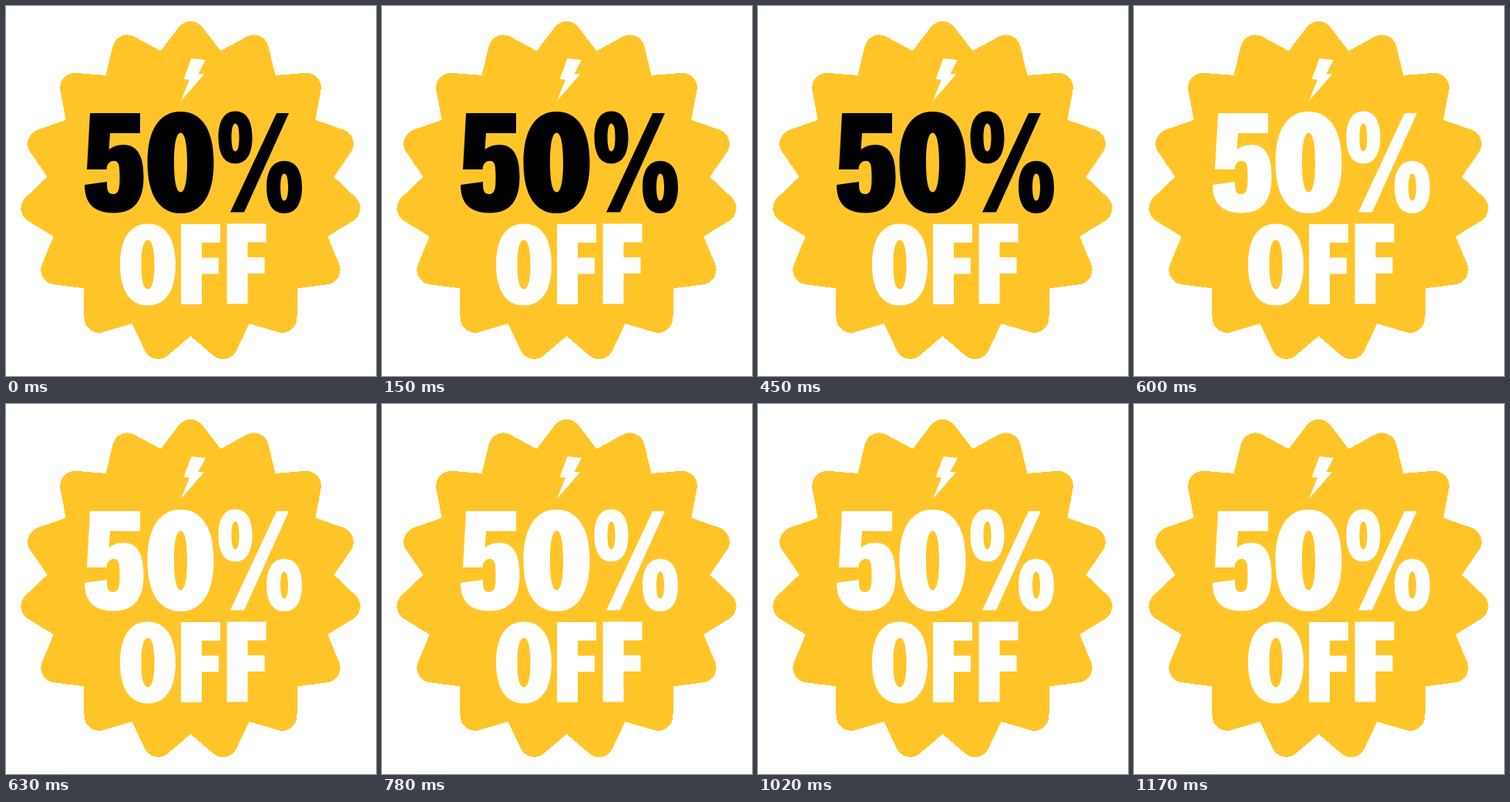
Animation of 480x480 px, one loop 1200 ms. Source, as an HTML page:

```html
<!DOCTYPE html>
<html lang="en">
<head>
<meta charset="utf-8">
<title>50% OFF</title>
<style>
  html, body { margin: 0; width: 100%; height: 100%; overflow: hidden; background: #fff; }
  svg { display: block; width: 100vw; height: 100vh; }
  #badge {
    fill: #ffc528; stroke: #ffc528; stroke-width: 38.4; stroke-linejoin: round;
    shape-rendering: crispEdges;
  }
  .white { fill: #fff; }
  #amount { animation: blink 1200ms step-end infinite; }
  path { fill-rule: evenodd; }
  @keyframes blink {
    0% { fill: #000; }
    50% { fill: #fff; }
  }
</style>
</head>
<body>
<svg viewBox="0 0 480 480" role="img" aria-label="50% OFF">
  <polygon id="badge"/>
  <polygon class="white" points="240.500,68 259,70 249.500,88 257,88.500 227,123 238,95.500 230.500,95"/>
  <g id="amount">
    <path d="M109 139H174V165H135L133.500 186C139 182 145 180 152 180C171 180 178.500 195 178.500 222
      C178.500 254 165 268.500 140 268.500C115 268.500 102 257 102 232L131 228V231
      C131 240 133 244 139 244C146 244 147.500 238 147.500 222C147.500 206 146 201 140 201
      C134 201 131 205 130.500 212H105Z"/>
    <path data-ring="226.5 203 43 66 8.5 38.5"/>
    <path data-ring="297.5 170.5 22 34 5 18"/>
    <path d="M351 139H367L309 267.500H291Z"/>
    <path data-ring="361 235 23 34 5 17.5"/>
  </g>
  <g class="white">
    <path data-ring="184 335.5 36 53 8.5 32"/>
    <path id="f" d="M227 283H278V307H254V326.500H276V347.500H254V387H227Z"/>
    <use href="#f" x="59.500" y="-0.500"/>
  </g>
</svg>
<script>
  // Fifteen-point badge; the thick round-joined stroke softens its tips.
  const points = Array.from({ length: 30 }, (_, i) => {
    const angle = i * Math.PI / 15;
    const radius = i % 2 ? 161.7 : 202;
    return [239.5 + radius * Math.sin(angle), 241.2 - radius * Math.cos(angle)];
  });
  document.getElementById('badge').setAttribute('points', points.join(' '));

  // A slightly squared oval built from four curves.
  function oval(cx, cy, rx, ry) {
    const kx = rx * 0.62, ky = ry * 0.66;
    return `M${cx} ${cy - ry}
      c${kx} 0 ${rx} ${ry - ky} ${rx} ${ry}
      s${kx - rx} ${ry} ${-rx} ${ry}
      s${-rx} ${ky - ry} ${-rx} ${-ry}
      s${rx - kx} ${-ry} ${rx} ${-ry}z`;
  }

  for (const ring of document.querySelectorAll('[data-ring]')) {
    const [cx, cy, rx, ry, innerX, innerY] = ring.dataset.ring.split(' ').map(Number);
    ring.setAttribute('d', oval(cx, cy, rx, ry) + oval(cx, cy, innerX, innerY));
  }
</script>
</body>
</html>
```
